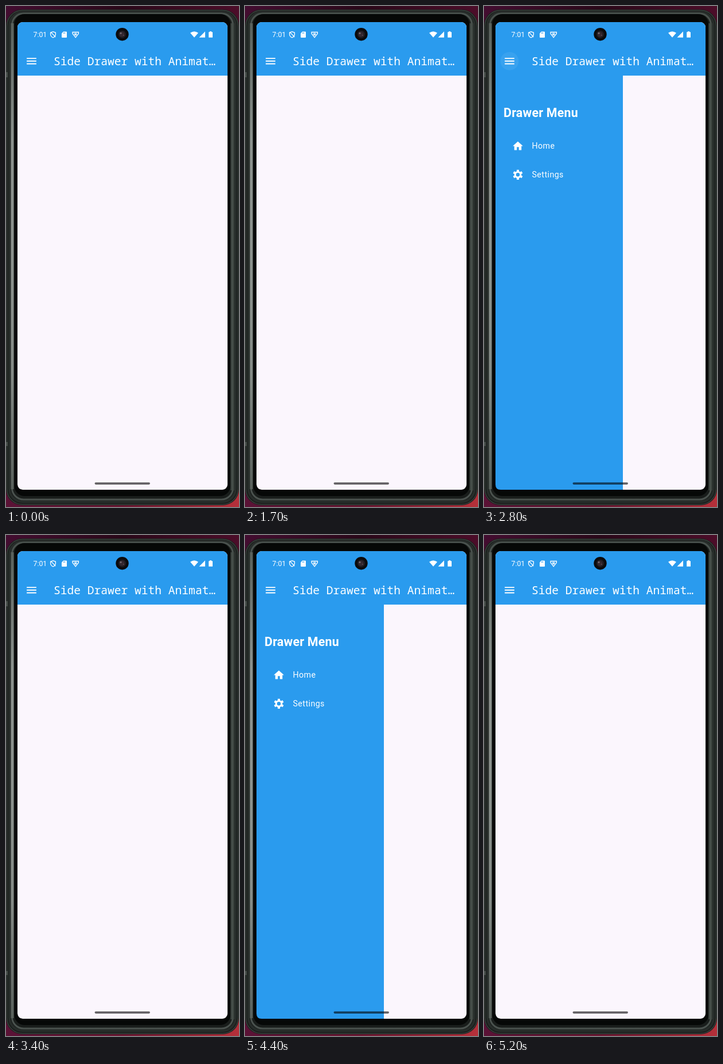
An HTML page with a canvas for the animation above (5.5 s loop, 406 by 871 pixels).

```html
<!DOCTYPE html>
<html lang="en">
<head>
<meta charset="utf-8">
<title>Side drawer</title>
<style>
  html, body { margin: 0; width: 100%; height: 100%; overflow: hidden; background: #2c0a1e; }
  canvas { display: block; width: 406px; height: 871px; }
</style>
</head>
<body>
<canvas id="stage"></canvas>
<script>
const W = 406, H = 871, LOOP = 5500, STEP = 100;
const BLUE = '#2a9bee', PAPER = '#fbf6fd';
const DRAWER_W = 222, SLIDE = 300;
const slides = [
  { at: 1733, open: true }, { at: 2883, open: false },
  { at: 3833, open: true }, { at: 4683, open: false }
];
const taps = [1710, 2780, 3810, 4580];

const canvas = document.getElementById('stage');
const dpr = window.devicePixelRatio || 1;
canvas.width = W * dpr;
canvas.height = H * dpr;
const c = canvas.getContext('2d');
c.scale(dpr, dpr);

const clamp = v => Math.max(0, Math.min(1, v));

// cubic-bezier(.42, 0, .58, 1)
function easeInOut(x) {
  let lo = 0, hi = 1, u = x;
  for (let i = 0; i < 20; i++) {
    u = (lo + hi) / 2;
    const bx = 3 * (1 - u) * (1 - u) * u * 0.42 + 3 * (1 - u) * u * u * 0.58 + u * u * u;
    if (bx < x) lo = u; else hi = u;
  }
  return u * u * (3 - 2 * u);
}

function drawerAt(t) {
  let pos = 0;
  for (const s of slides) {
    if (t < s.at) break;
    const p = easeInOut(clamp((t - s.at) / SLIDE));
    pos = s.open ? p : 1 - p;
  }
  return pos;
}

function gradient(x0, y0, x1, y1, ...colors) {
  const g = c.createLinearGradient(x0, y0, x1, y1);
  colors.forEach((col, i) => g.addColorStop(i / (colors.length - 1), col));
  return g;
}

function rect(x, y, w, h, fill) {
  c.fillStyle = fill;
  c.fillRect(x, y, w, h);
}

function round(x, y, w, h, r) {
  c.beginPath();
  c.roundRect(x, y, w, h, r);
}

function fillRound(x, y, w, h, r, fill) {
  round(x, y, w, h, r);
  c.fillStyle = fill;
  c.fill();
}

function strokeRound(x, y, w, h, r, width, color) {
  round(x, y, w, h, r);
  c.lineWidth = width;
  c.strokeStyle = color;
  c.stroke();
}

function disc(x, y, r, fill) {
  c.beginPath();
  c.arc(x, y, r, 0, 7);
  c.fillStyle = fill;
  c.fill();
}

function text(str, x, y, font, spacing = 0) {
  c.font = font;
  c.letterSpacing = spacing + 'px';
  c.fillStyle = '#fff';
  c.fillText(str, x, y);
}

function icon(d, cx, cy, scale) {
  c.save();
  c.translate(cx, cy);
  c.scale(scale, scale);
  c.translate(-12, -12);
  c.fillStyle = '#fff';
  c.fill(new Path2D(d), 'evenodd');
  c.restore();
}

function gear(cx, cy) {
  c.beginPath();
  for (let i = 0; i < 6; i++) {
    const a = i * Math.PI / 3 - Math.PI / 2;
    [[-0.34, 6.2], [-0.22, 8.8], [0.22, 8.8], [0.34, 6.2]].forEach(([da, r]) =>
      c.lineTo(cx + r * Math.cos(a + da), cy + r * Math.sin(a + da)));
  }
  c.closePath();
  c.moveTo(cx + 3.2, cy);
  c.arc(cx, cy, 3.2, 0, 2 * Math.PI);
  c.fillStyle = '#fff';
  c.fill('evenodd');
}

function phone() {
  rect(0, 0, W, H, gradient(0, 0, W, 0, '#430d30', '#2a0819', '#4c0d29'));
  rect(0, 800, W, 71, gradient(0, 0, W, 0, '#5a1236', '#6a1732', '#b5303a'));
  fillRound(0, 6, 406, 862, 28, '#191d1b');
  strokeRound(1.5, 7.5, 403, 859, 27, 1.5, '#39403c');
  strokeRound(6, 11, 394, 851, 23, 4, '#272d2a');
  strokeRound(10.5, 13, 385, 845, 20, 3, gradient(0, 13, 0, 858, '#4a524e', '#3d4541', '#4a524e'));
  rect(8.5, 30, 5, 810, gradient(0, 30, 0, 840, '#59615c', '#8c938e', '#8c938e', '#858c87', '#59615c'));
  rect(391, 30, 7, 812, gradient(391, 0, 398, 0, '#2c322f', '#4a534e', '#303632'));
  fillRound(14.5, 14, 376.5, 838, 18, '#060807');
  rect(0, 115, 3, 9, '#4b524e');
  rect(0, 758, 3, 7, '#4b524e');
}

function statusBar() {
  text('7:01', 47.5, 54, '12.3px Roboto, sans-serif');
  c.strokeStyle = c.fillStyle = '#fff';
  c.lineWidth = 1.3;
  c.stroke(new Path2D('M82 44.6L86.4 46.3V49.5Q86 53.3 82 55Q78 53.3 77.6 49.5V46.3ZM78 45.4L86.4 54'));
  c.fill(new Path2D('M100 44.5H105Q106 44.5 106 45.5V54Q106 55 105 55H98Q97 55 97 54V47.5Z'));
  rect(100, 46, 1, 2, BLUE);
  rect(102, 46, 1, 2, BLUE);
  c.strokeStyle = '#fff';
  c.stroke(new Path2D('M116 45.5H126.4V48L121.2 54.6L116 48Z'));
  disc(121.2, 49, 2.2, '#fff');
  disc(121.2, 48.6, 0.8, BLUE);

  c.fillStyle = '#fff';
  c.fill(new Path2D('M321 46.8Q328 41.7 335 46.8L328 54.8Z'));
  c.fill(new Path2D('M336.5 54.8H347V44.3Z'));
  c.fill(new Path2D('M355 44H358V45.2H360V54.8H353.2V45.2H355Z'));

  disc(202.5, 49.2, 11.2, '#0b0b0d');
  disc(202.5, 49.2, 6.5, '#211d22');
  disc(202, 49.2, 4.2, '#34282f');
  disc(200, 47.2, 1.5, '#776b72');
  disc(205, 51, 1.1, '#594650');
}

function ripple(t) {
  for (const tap of taps) {
    const dt = t - tap;
    if (dt < 0 || dt > 480) continue;
    const grow = clamp(dt / 120);
    const fade = 1 - clamp((dt - 260) / 220);
    disc(44.5, 95.8, 15.5 + 2.5 * grow, `rgba(255,255,255,${(0.06 + 0.05 * grow) * fade})`);
  }
}

function drawer(pos) {
  if (pos <= 0) return;
  const dx = (pos - 1) * DRAWER_W;
  rect(20, 121, DRAWER_W + dx, 720, BLUE);
  c.save();
  c.beginPath();
  c.rect(16, 121, 370, 720);
  c.clip();
  c.translate(dx, 0);
  text('Drawer Menu', 34, 193, 'bold 21.4px Roboto, sans-serif', 0.22);
  icon('M10 20v-6h4v6h5v-8h3L12 3 2 12h3v8z', 59, 243.5, 0.89);
  text('Home', 83.5, 248, '14.2px Roboto, sans-serif', 0.445);
  gear(59, 293.3);
  text('Settings', 83.5, 298, '14.2px Roboto, sans-serif', 0.445);
  c.restore();
}

function draw(t) {
  phone();
  fillRound(20, 28, 366, 813, 9, PAPER);
  c.save();
  round(20, 28, 366, 813, 9);
  c.clip();
  rect(20, 28, 366, 93, BLUE);
  c.restore();

  statusBar();
  ripple(t);
  icon('M3 18h18v-2H3zM3 13h18v-2H3zM3 6v2h18V6z', 44.5, 95.8, 0.93);
  text('Side Drawer with Animat…', 83, 102.5, '19.6px "Noto Sans Mono", monospace');

  drawer(drawerAt(t));
  // rounded lower corner over the drawer
  c.fillStyle = '#060807';
  c.fill(new Path2D('M20 832V841H29Q20 841 20 832Z'));
  fillRound(154.5, 828.3, 96.5, 3.6, 1.8, 'rgba(0,0,0,.6)');
}

const start = performance.now();
function tick() {
  const t = (performance.now() - start) % LOOP;
  draw(Math.floor(t / STEP) * STEP);
  requestAnimationFrame(tick);
}
tick();
</script>
</body>
</html>
```
